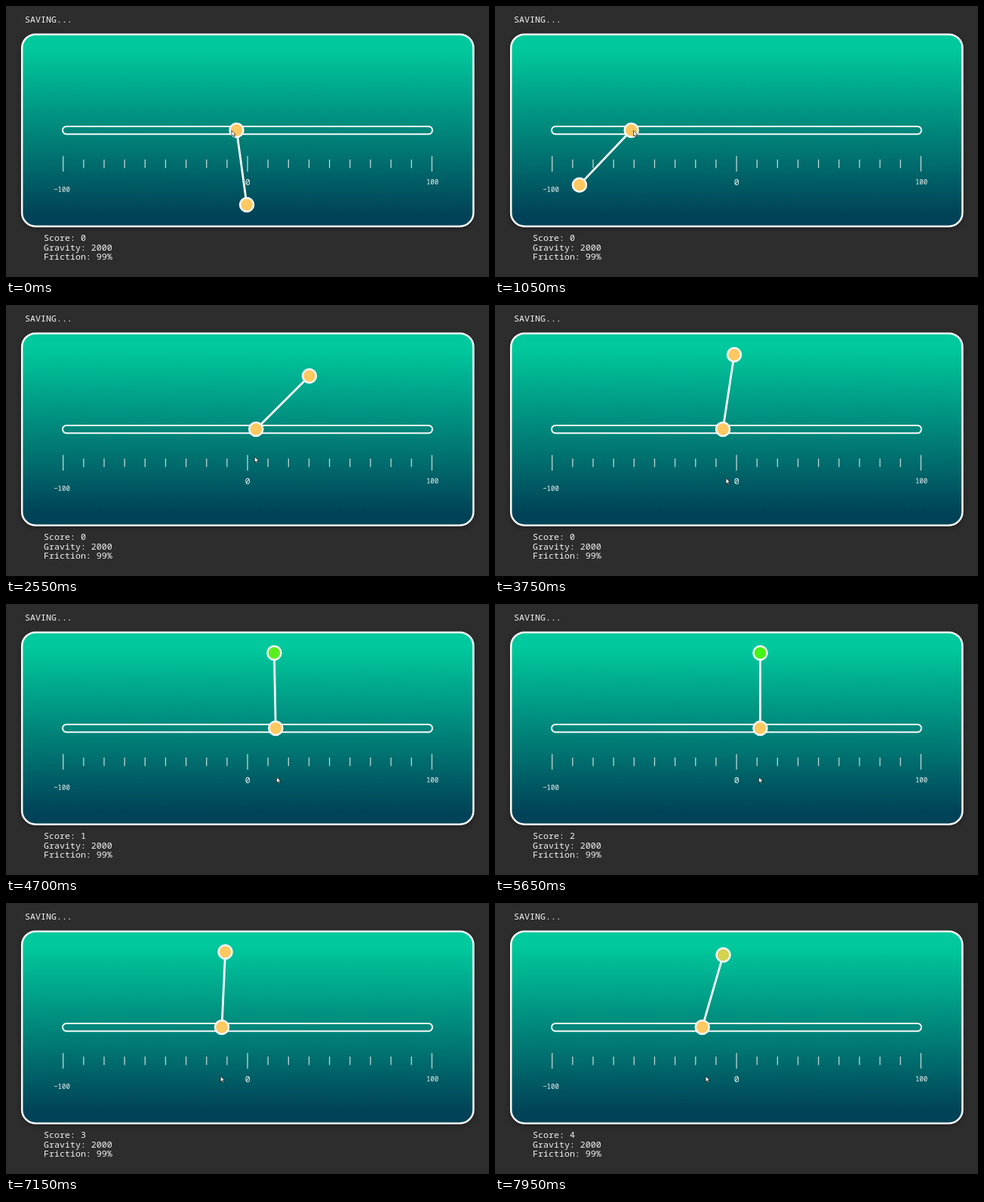
These frames come from a looping animation (640x360 px, 8000 ms). An HTML page:

```html
<!DOCTYPE html>
<html lang="en">
<head>
<meta charset="utf-8">
<title>Pendulum balance</title>
<style>
  html, body { margin: 0; width: 100%; height: 100%; overflow: hidden; background: #2d2d2d; }
  svg { display: block; width: 100%; height: 100%; }
  text { font: 500 11.65px "Noto Sans Mono", "DejaVu Sans Mono", monospace; fill: #f4f4f4; white-space: pre; }
  .small { font-size: 9px; }
  .mid { text-anchor: middle; }
  .line { stroke: #f8fbfa; fill: none; }
  .ball { stroke: #f8fbfa; stroke-width: 2.5; fill: #ffc861; }
</style>
</head>
<body>
<svg viewBox="0 0 640 360" xmlns="http://www.w3.org/2000/svg">
  <defs>
    <linearGradient id="sea" gradientUnits="userSpaceOnUse" x1="0" y1="57" x2="0" y2="278">
      <stop offset="0" stop-color="#00c99d"/>
      <stop offset="1" stop-color="#004257"/>
    </linearGradient>
    <filter id="soft" x="-5%" y="-10%" width="110%" height="120%">
      <feGaussianBlur stdDeviation="3"/>
    </filter>
  </defs>
  <rect width="640" height="360" fill="#2d2d2d"/>
  <rect x="20" y="39" width="600" height="256" rx="18" fill="#000" opacity=".35" filter="url(#soft)"/>
  <rect class="line" x="21.2" y="37.7" width="598.2" height="255" rx="18" style="fill:url(#sea)" stroke-width="2.5"/>
  <text x="25" y="22">SAVING...</text>
  <text id="score" x="50" y="312">Score: 0</text>
  <text x="50" y="325">Gravity: 2000</text>
  <text x="50" y="337.3">Friction: 99%</text>
  <g id="ticks" class="line"></g>
  <text class="small mid" x="74" y="247">−100</text>
  <text class="mid" x="320.3" y="238">0</text>
  <text class="small mid" x="565" y="237">100</text>
  <rect class="line" x="75" y="159.9" width="490" height="10.3" rx="5.15" stroke-width="2"/>
  <line id="rod" class="line" stroke-width="2.8"/>
  <circle id="bob" class="ball" r="9"/>
  <circle id="cart" class="ball" r="9" cy="165"/>
  <path id="cursor" d="M0 0V7.6L1.8 6L3 8.7L4.3 8.1L3.1 5.5H5.4Z" fill="#fff" stroke="#111" stroke-width=".7"/>
</svg>
<script>
const LOOP = 8000, STEP = 50, PIVOT_Y = 165, LENGTH = 100;
const FIRST_SCORE = 4640, SCORE_EVERY = 1000, FLASH = 400;
const ORANGE = [255, 200, 97], GREEN = [62, 245, 18];
const HAND_LEAD = 50; // the cart trails the hand by this many ms

// Turning points of the hand-dragged cart: time, x
const drag = [
  [0, 305.5], [1000, 180], [1700, 285], [2450, 333], [3350, 281],
  [3750, 302], [4150, 337], [5250, 362], [7150, 286], [7850, 270], [8100, 288]
];
// Swing up, then balance: time, degrees from straight down
const swing = [
  [0, 7.8], [400, 17], [1050, -43.4], [1250, -50], [1720, 0], [2550, 135],
  [3200, 181], [3750, 171.4], [4150, 180], [5650, 180], [7150, 177.4], [8000, 163]
];

const get = id => document.getElementById(id);
const set = (el, attrs) => { for (const k in attrs) el.setAttribute(k, attrs[k]); };
const [rod, bob, cart, cursor, score] = ["rod", "bob", "cart", "cursor", "score"].map(get);

get("ticks").innerHTML = Array.from({ length: 19 }, (_, i) => {
  const x = 75.7 + i * 27.15, h = i % 9 ? 5.7 : 10.3;
  return `<path d="M${x} ${209.6 - h}v${2 * h}" stroke-width="1.3" opacity=".75"/>`;
}).join("");

// Smooth curve through points
function curve(points, t) {
  const last = points.length - 1;
  const next = points.findIndex(p => p[0] > t);
  const i = next < 0 ? last - 1 : Math.max(0, next - 1);
  const slope = n => {
    const [t0, v0] = points[Math.max(0, n - 1)], [t1, v1] = points[Math.min(last, n + 1)];
    return (v1 - v0) / (t1 - t0);
  };
  const [t0, a] = points[i], [t1, b] = points[i + 1];
  const u = (t - t0) / (t1 - t0), v = 1 - u;
  return v * v * (1 + 2 * u) * a + u * u * (3 - 2 * u) * b
    + (t1 - t0) * u * v * (v * slope(i) - u * slope(i + 1));
}

// The hand slips from the cart down to the scale once the swing is under way
function handY(t) {
  const u = Math.min(1, Math.max(0, (t - 1200) / 2500));
  return 165.5 + 64.5 * u * u * (3 - 2 * u);
}

function draw(t) {
  const x = curve(drag, t), angle = curve(swing, t) * Math.PI / 180;
  const bx = x + LENGTH * Math.sin(angle), by = PIVOT_Y + LENGTH * Math.cos(angle);
  const points = Math.max(0, Math.floor((t - FIRST_SCORE) / SCORE_EVERY) + 1);
  const age = t - FIRST_SCORE - (points - 1) * SCORE_EVERY;
  const glow = points ? Math.max(0, 1 - age / FLASH) : 0;
  const tint = ORANGE.map((c, i) => Math.round(c + (GREEN[i] - c) * glow));

  set(rod, { x1: x, y1: PIVOT_Y, x2: bx, y2: by });
  set(bob, { cx: bx, cy: by });
  bob.style.fill = `rgb(${tint})`;
  set(cart, { cx: x });
  set(cursor, { transform: `translate(${curve(drag, t + HAND_LEAD)} ${handY(t)})` });
  score.textContent = "Score: " + points;
}

function tick() {
  draw(Math.floor(performance.now() % LOOP / STEP) * STEP);
  requestAnimationFrame(tick);
}
tick();
</script>
</body>
</html>
```
